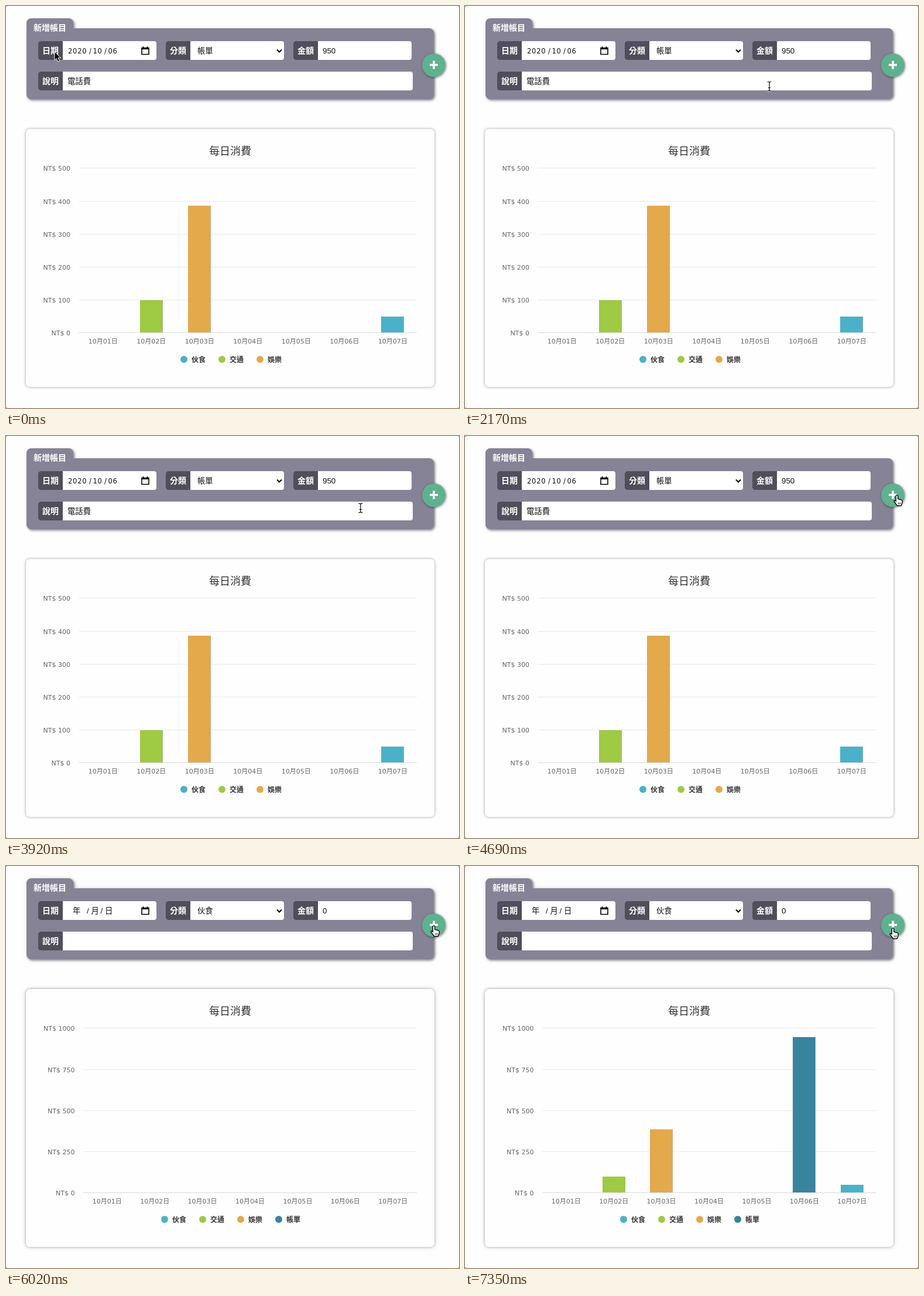
An HTML page that plays this animation: 774 px wide and 686 px high, repeating every 7420 ms.

```html
<!DOCTYPE html>
<html lang="zh-Hant">
<head>
<meta charset="utf-8">
<title>每日消費</title>
<style>
  html, body { margin: 0; width: 100%; height: 100%; overflow: hidden; background: #888; }
  svg { display: block; width: 774px; height: 686px; border-radius: 3px; background: #fefefe; }
  text { font: 13.33px "Liberation Sans", "Noto Sans CJK TC", "Noto Sans CJK", sans-serif; fill: #111; }
  .label { font-size: 14px; font-weight: bold; fill: #fff; }
  .date { font: 11.5px "DejaVu Sans", "Noto Sans CJK TC", "Noto Sans CJK", sans-serif; letter-spacing: .8px; }
  .title { font-size: 18px; fill: #333; text-anchor: middle; }
  .axis { font: 11px "DejaVu Sans", "Noto Sans CJK TC", "Noto Sans CJK", sans-serif; fill: #666; }
  .mid { text-anchor: middle; }
  .end { text-anchor: end; }
  .legend { font-size: 12px; font-weight: bold; fill: #333; }
  #panel { filter: drop-shadow(2px 2px 2px rgba(0,0,0,.5)); }
  #card { filter: drop-shadow(0 0 2.5px rgba(0,0,0,.38)); }
  .saved #panel { filter: drop-shadow(2px 2px 2px rgba(0,0,0,.5)) drop-shadow(0 0 4px rgba(0,0,0,.07)); }
  .saved #card { filter: drop-shadow(0 0 2.5px rgba(0,0,0,.32)) drop-shadow(0 0 4px rgba(0,0,0,.1)); }
  #button { filter: drop-shadow(1px 1px 2px rgba(0,0,0,.5)); }
</style>
</head>
<body>
<svg id="stage" viewBox="0 0 774 686">
  <path id="panel" fill="#878396" d="M35 29a8 8 0 0 1 8-8h64a8 8 0 0 1 8 8v9h608a8 8 0 0 1 8 8v105a8 8 0 0 1-8 8H43a8 8 0 0 1-8-8z"/>
  <text class="label" x="47" y="42">新增帳目</text>
  <g id="fields"></g>
  <path d="M232 71.5h12v11h-12zM234.5 69v2M241.500 69v2" fill="none" stroke="#000" stroke-width="1.6"/>
  <path d="M232 71h12v3h-12z"/>
  <path d="M463 74.500l4 4 4-4" fill="none" stroke="#000" stroke-width="2"/>
  <g id="values"></g>
  <circle id="button" cx="731" cy="101" r="20" fill="#5fb18f"/>
  <path d="M724 100.500h14M731 93.500v14" stroke="#fff" stroke-width="3.600"/>
  <rect id="card" x="34" y="210" width="698" height="440" rx="7" fill="#fefefe"/>
  <text class="title" x="383" y="254">每日消費</text>
  <g id="chart"></g>
  <g id="bars"></g>
  <g id="cursor">
    <path id="arrow" d="M0 0v14.500l3.300-3 2.400 5.600 2.700-1.200-2.400-5.400h4.500z" fill="#000" stroke="#fff"/>
    <g id="beam" fill="none">
      <path d="M-3.500-8q3 0 3.500 1.500 .5-1.500 3.500-1.500M0-7V7M-3.500 8q3 0 3.500-1.500 .5 1.500 3.500 1.500M-2 2.500h4" stroke="#fff" stroke-width="3"/>
      <path d="M-3.500-8q3 0 3.500 1.500 .5-1.500 3.500-1.500M0-7V7M-3.500 8q3 0 3.500-1.500 .5 1.500 3.500 1.500M-2 2.500h4" stroke="#000" stroke-width="1.200"/>
    </g>
    <g id="hand">
      <path d="M-1.700 1.500a1.700 1.700 0 0 1 3.400 0v5l5.800 1.400q2 .5 1.700 3l-.6 3.600-1.500 3.500H.6l-4.500-6q-2-2.700 .3-3.200l1.900 1.500z" fill="#fff" stroke="#000" stroke-width="1.300"/>
      <path d="M2.200 12.500v3M4.200 12.500v3M6.200 12.500v3" stroke="#000" stroke-width=".8"/>
    </g>
  </g>
</svg>
<script>
const LOOP = 7420, STEP = 70, SAVE = 5950, GROW = 5978, GROW_TIME = 1040;
const $ = id => document.getElementById(id);
const text = (x, y, s, cls = '') => `<text class="${cls}" x="${x}" y="${y}">${s}</text>`;

const series = [
  { name: '伙食', color: '#4ab1c9', day: 7, cost: 50 },
  { name: '交通', color: '#9fca43', day: 2, cost: 100 },
  { name: '娛樂', color: '#e3a94b', day: 3, cost: 388 },
  { name: '帳單', color: '#38849e', day: 6, cost: 950 }
];
const before = { left: 124.5, max: 500, tick: 100, count: 3, legend: 304 };
const after = { left: 132, max: 1000, tick: 250, count: 4, legend: 271 };
const RIGHT = 702, BASE = 557;

// Time, x and y of the pointer's hot spot
const path = [
  [0, 83, 78], [140, 83, 78], [1260, 494, 108], [1960, 520, 137], [3500, 520, 137],
  [4480, 738, 101], [4760, 738, 101], [5320, 731, 102], [6720, 731, 102], [7140, 731, 106], [LOOP, 731, 106]
];

$('fields').innerHTML = [
  [55, 60, 202, '日期'], [273, 60, 202, '分類'], [491, 60, 202, '金額'], [55, 112, 640, '說明']
].map(([x, y, w, name]) =>
  `<rect x="${x}" y="${y}" width="${w}" height="32" rx="4" fill="#fff"/>
   <path d="M${x + 42} ${y}v32h-38a4 4 0 0 1-4-4v-24a4 4 0 0 1 4-4z" fill="#514e5c"/>` +
  text(x + 7, y + 20.5, name, 'label')).join('');

const centre = (c, day) => c.left + (day - .5) * (RIGHT - c.left) / 7;

function drawState(saved) {
  const c = saved ? after : before;
  $('stage').classList.toggle('saved', saved);
  const date = saved
    ? text(114, 81, '年') + text(138, 81, '/') + text(145.5, 81, '月') + text(161.5, 81, '/') + text(169, 81, '日')
    : [[106, '2020'], [142, '/'], [148.5, '10'], [168, '/'], [174.5, '06']]
        .map(([x, s]) => text(x, 80.5, s, 'date')).join('');
  $('values').innerHTML = date + text(327, 81, saved ? '伙食' : '帳單') +
    text(541, 81, saved ? '0' : '950') + (saved ? '' : text(105, 133, '電話費'));

  let chart = '';
  for (let v = 0; v <= c.max; v += c.tick) {
    const y = BASE + .5 - 280 * v / c.max - (v === c.max);
    chart += `<path d="M${c.left} ${y}H${RIGHT}" stroke="${v ? '#e9e9e9' : '#d8dae2'}"/>` +
      text(c.left - 14.5, Math.round(y) + 4, 'NT$ ' + v, 'axis end');
  }
  for (let day = 1; day <= 7; day++)
    chart += text(centre(c, day), 576, `10月0${day}日`, 'axis mid');
  series.slice(0, c.count).forEach((s, i) => {
    const x = c.legend + 65 * i;
    chart += `<circle cx="${x}" cy="603" r="6" fill="${s.color}"/>` + text(x + 13, 608, s.name, 'legend');
  });
  $('chart').innerHTML = chart;
}

function drawBars(c, scale) {
  $('bars').innerHTML = series.slice(0, c.count).map(s => {
    const x = Math.round(centre(c, s.day) - 19.5);
    const h = Math.max(0, 280 * s.cost / c.max * scale - 1);
    return `<rect x="${x}" y="${BASE - h}" width="39" height="${h}" fill="${s.color}"/>
      <rect x="${x + 38}" y="${BASE - h}" width="1" height="${h}" fill="#aaa" opacity=".6"/>`;
  }).join('');
}

function pointer(t) {
  const i = path.findIndex(p => p[0] > t);
  const [t0, x0, y0] = path[i - 1], [t1, x1, y1] = path[i];
  const u = (t - t0) / (t1 - t0), k = u * u * (3 - 2 * u);
  return [x0 + (x1 - x0) * k, y0 + (y1 - y0) * k];
}

function drawCursor(t) {
  const [x, y] = pointer(t);
  const within = (l, top, r, b) => x > l && x < r && y > top && y < b;
  const kind = Math.hypot(x - 731, y - 101) < 20 ? 'hand'
    : within(533, 60, 693, 92) || within(97, 112, 695, 144) ? 'beam' : 'arrow';
  for (const id of ['arrow', 'beam', 'hand']) $(id).style.display = id === kind ? '' : 'none';
  $('cursor').setAttribute('transform', `translate(${x} ${y})`);
}

let state, last;
const start = performance.now();
function frame() {
  const t = Math.floor((performance.now() - start) % LOOP / STEP) * STEP;
  if (t !== last) {
    last = t;
    const saved = t >= SAVE;
    if (saved !== state) drawState(state = saved);
    const u = Math.min(1, Math.max(0, (t - GROW) / GROW_TIME));
    drawBars(saved ? after : before, saved ? (1 - Math.cos(Math.PI * u)) / 2 : 1);
    drawCursor(t);
  }
  requestAnimationFrame(frame);
}
frame();
</script>
</body>
</html>
```
